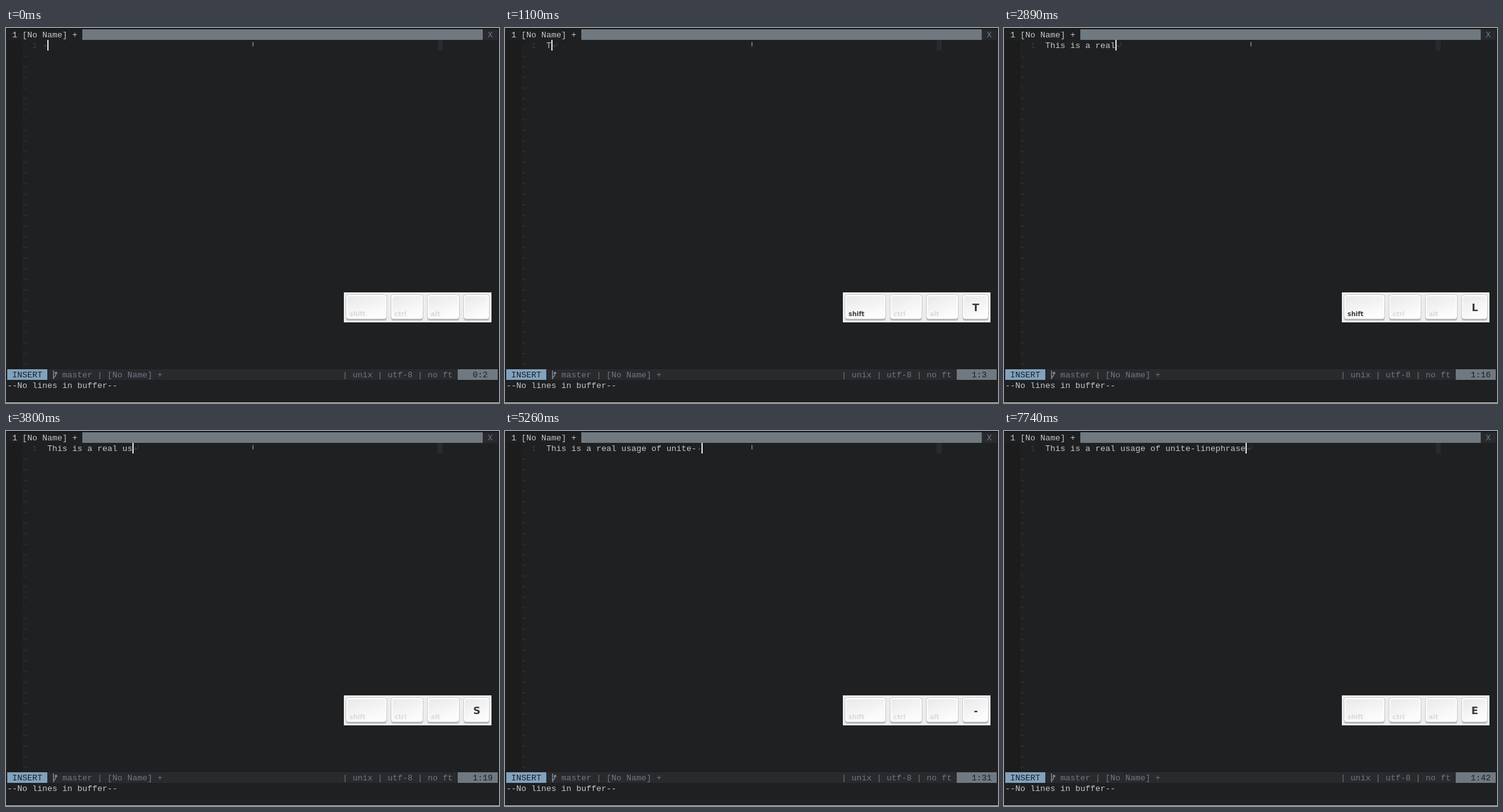
Write an HTML page that moves like this. It is 788 px wide and 600 px high and loops after 8 s.

```html
<!DOCTYPE html>
<html lang="en">
<head>
<meta charset="utf-8">
<title>Editor typing</title>
<style>
  html, body { margin: 0; width: 100%; height: 100%; overflow: hidden; background: #1d1f21; }
  svg { display: block; }
  text { white-space: pre; }
  .mono { font: 13.333px "Liberation Mono", monospace; fill: #c5c8c6; }
  .mono .mute { fill: #707880; }
  .mono .dark { fill: #1d1f21; }
  .mono .dim { fill: #34383c; }
  .cap { font: bold 10px "DejaVu Sans", sans-serif; fill: #dadada; }
  .cap.on { fill: #3c3c3c; }
  #key { font: bold 16px "DejaVu Sans", sans-serif; fill: #3c3c3c; text-anchor: middle; }
</style>
</head>
<body>
<svg width="788" height="600" viewBox="0 0 788 600">
  <defs>
    <linearGradient id="face" x1="0" y1="0" x2="0.5" y2="1">
      <stop offset="0" stop-color="#e9e9e9"/>
      <stop offset="1" stop-color="#fcfcfc"/>
    </linearGradient>
  </defs>

  <rect width="788" height="600" fill="#1e2022"/>
  <rect width="788" height="2" fill="#15181a"/>
  <rect x="2" y="19" width="24" height="527" fill="#1c1c1c"/>
  <rect x="122" y="2" width="640" height="17" fill="#707880"/>
  <rect x="762" y="2" width="24" height="17" fill="#282a2e"/>
  <rect x="690" y="19" width="8" height="17" fill="#282a2e"/>
  <rect x="2" y="546" width="784" height="17" fill="#282a2e"/>
  <rect x="2" y="546" width="64" height="17" fill="#81a2be"/>
  <rect x="722" y="546" width="64" height="17" fill="#707880"/>
  <rect y="599" width="788" height="1" fill="#c8c8c8"/>

  <g class="mono" id="screen">
    <text x="10" y="15">1 [No Name] +</text>
    <text class="mute" x="770" y="15">X</text>
    <text class="dim" x="42" y="32">1</text>
    <text class="dark" x="10" y="559">INSERT</text>
    <text class="mute" x="90" y="559">master | [No Name] +</text>
    <text class="mute" x="538" y="559">| unix | utf-8 | no ft</text>
    <text class="dark" id="pos" x="746" y="559"></text>
    <text x="2" y="576">--No lines in buffer--</text>
    <text id="line" x="66" y="32"></text>
    <text class="dim" id="trail" y="32">-</text>
  </g>
  <path d="M76 548V562M76.5 559Q80 557 80 551M78 553L80 550.5L82 553" fill="none" stroke="#8b9297" stroke-width="1.4"/>

  <rect id="speck" x="394" y="22.5" width="1.4" height="7" fill="#8a9094"/>
  <g id="eol">
    <path d="M9 22.500V28.500H4" fill="none" stroke="#393d42" stroke-width="1.2"/>
    <path d="M2 28.500L5.500 25.800V31.200Z" fill="#393d42"/>
  </g>
  <rect id="caret" y="19" width="2" height="17" fill="#e4e6e4"/>

  <g id="popup">
    <rect x="56" width="732" height="138" fill="#1e2022"/>
    <rect x="56" width="714" height="138" fill="#0055aa"/>
    <rect x="770" width="13" height="138" fill="#000"/>
  </g>

  <rect x="540" y="423" width="236" height="48" fill="#ececec"/>
  <g id="caps"></g>
  <text class="cap" id="shift" x="549" y="461">shift</text>
  <text class="cap" x="621" y="461">ctrl</text>
  <text class="cap" x="679" y="461">alt</text>
  <text id="key" x="752.5" y="453"></text>
</svg>
<script>
const LOOP = 8000, CELL = 8, SETTLE = 40;
const PHRASE = 'This is a real usage of unite-linephrase';
// When each character lands on screen
const typed = [
  1010, 1300, 1420, 1550, 1680, 2010, 2100, 2230, 2340, 2480,
  2660, 2750, 2790, 2890, 3440, 3570, 3750, 3840, 3920, 4020,
  4120, 4300, 4400, 4560, 4600, 4730, 4850, 4930, 5090, 5260,
  5960, 6480, 6700, 6830, 7010, 7210, 7300, 7430, 7650, 7740
];
// Characters whose caret and position update at once
const instant = new Set([4, 5, 9, 11, 13, 14, 20, 23, 26, 37, 38, 39]);

const el = id => document.getElementById(id);
const [pos, line, trail, eol, caret, speck, popup, shift, key] =
  ['pos', 'line', 'trail', 'eol', 'caret', 'speck', 'popup', 'shift', 'key'].map(el);
const show = (node, on) => node.setAttribute('visibility', on ? 'visible' : 'hidden');
const within = (t, a, b) => t >= a && t < b;

function add(parent, tag, attrs, content = '') {
  const node = document.createElementNS('http://www.w3.org/2000/svg', tag);
  for (const name in attrs) node.setAttribute(name, attrs[name]);
  node.textContent = content;
  parent.appendChild(node);
}

for (let row = 2; row < 32; row++) {
  add(el('screen'), 'text', { x: 26, y: 15 + 17 * row, class: 'dim' }, '~');
}

for (const [x, width] of [[543, 66], [615, 52], [673, 52], [731, 42]]) {
  const cap = (inset, y, height, fill, stroke) => add(el('caps'), 'rect', {
    x: x + inset, y, width: width - 2 * inset, height, rx: 4, fill, stroke
  });
  cap(0.5, 427, 41, '#b2b2b2', 'none');
  cap(0.5, 426.5, 39, '#fff', '#cbcbcb');
  cap(2.5, 429, 35, 'url(#face)', 'none');
}

function draw(t) {
  const n = typed.filter(at => at <= t).length;
  const last = n - 1;
  const settled = !n || instant.has(last) || t >= typed[last] + SETTLE;
  const end = n ? 66 + CELL * n : 58;
  const col = settled ? n : n - 1;

  line.textContent = PHRASE.slice(0, n);
  pos.textContent = `${col ? 1 : 0}:${col + 2}`;
  eol.setAttribute('transform', `translate(${end} 0)`);
  caret.setAttribute('x', n && settled ? end : end + CELL);
  show(caret, !within(t, 330, 580));

  trail.setAttribute('x', end - CELL);
  show(trail, n && PHRASE[last] === ' ');
  show(speck, n < PHRASE.length);
  show(popup, within(t, 970, 1010));

  shift.classList.toggle('on', within(t, 810, 3440));
  key.textContent = n && !within(t, 5800, 5960) ? PHRASE[last].toUpperCase() : '';
}

function tick() {
  draw(performance.now() % LOOP);
  requestAnimationFrame(tick);
}
tick();
</script>
</body>
</html>
```
